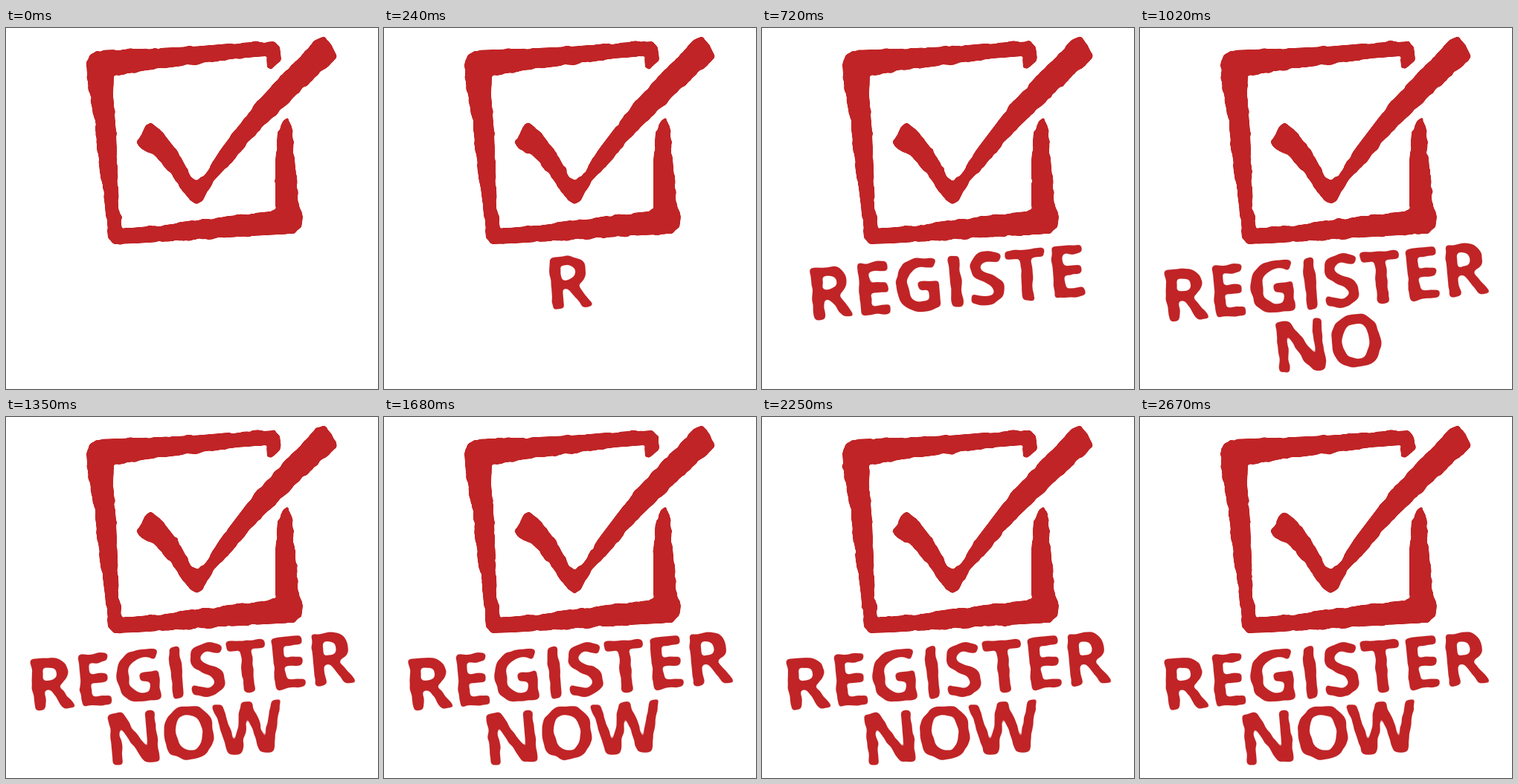
These frames come from a looping animation (500 by 486 pixels, 2.7 s). An HTML page:

```html
<!DOCTYPE html>
<html lang="en">
<head>
<meta charset="utf-8">
<style>
  html, body { margin: 0; height: 100%; overflow: hidden; background: #fff; }
  svg { display: block; width: 500px; height: 486px; }
  .ink { fill: #c02426; }
  text {
    font: 700 98px "Open Sans", "Noto Sans", sans-serif;
    letter-spacing: -1.5px;
    text-anchor: middle;
  }
  #line2 { letter-spacing: -4.5px; }
</style>
</head>
<body>
<svg viewBox="0 0 500 486">
  <defs></defs>
  <g class="ink" filter="url(#roughMark)">
    <path d="M108 48 L111 37 L120 30 L180 28 L250 25 L300 21 L345 18 L361 17 L368 25 L370 42
      L357 55 L351 53 L350 38 L310 41 L270 47 L190 57 L145 64 L144 90 L148 140 L150 190 L152 240
      L156 270 L215 265 L300 253 L355 248 L362 243 L362 180 L365 140 L372 126 L380 120 L384 132
      L390 200 L393 240 L399 253 L397 270 L388 277 L330 280 L240 286 L175 290 L146 291 L137 283
      L133 240 L124 170 L117 110 L110 75 Z"/>
    <path d="M175 155 L186 134 L193 127 L207 136 L232 168 L250 202 L257 205 L266 199 L288 164
      L335 102 L380 54 L418 15 L428 11 L437 22 L445 38 L440 45 L400 80 L372 108 L340 138
      L308 176 L280 206 L264 232 L255 237 L246 231 L228 205 L200 172 L179 160 Z"/>
  </g>
  <g class="ink" filter="url(#roughText)">
    <text id="line1" transform="translate(250.3 377) rotate(-5.1)"></text>
    <text id="line2" transform="translate(253.7 459.5) rotate(-5.1)"></text>
  </g>
</svg>
<script>
const LOOP = 2700, TICK = 30, TYPE = 90;
const find = s => document.querySelector(s);

// Fixed rough edge, a smaller edge that boils, then smoothing of the outline.
const rough = (id, seed, scale, blur) => `
  <filter id="${id}" filterUnits="userSpaceOnUse" x="0" y="0" width="500" height="486"
      color-interpolation-filters="sRGB">
    <feTurbulence type="fractalNoise" baseFrequency=".075" numOctaves="1" seed="${seed}" result="base"/>
    <feTurbulence type="fractalNoise" baseFrequency=".08" numOctaves="1" result="boil"/>
    <feDisplacementMap in="SourceGraphic" in2="base" scale="${scale}"
      xChannelSelector="R" yChannelSelector="G"/>
    <feDisplacementMap in2="boil" scale="2.5" xChannelSelector="R" yChannelSelector="G"/>
    <feGaussianBlur stdDeviation="${blur}"/>
    <feComponentTransfer><feFuncA type="linear" slope="6" intercept="-2.5"/></feComponentTransfer>
  </filter>`;
find('defs').innerHTML = rough('roughMark', 4, 5, 1.8) + rough('roughText', 9, 6, 2.8);

const boilMark = find('#roughMark [result=boil]');
const boilText = find('#roughText [result=boil]');
const line1 = find('#line1'), line2 = find('#line2');
let last = -1;

function draw(now) {
  const t = Math.floor(now % LOOP / TICK) * TICK;
  if (t !== last) {
    last = t;
    const typed = Math.max(0, Math.floor(t / TYPE) - 1);
    line1.textContent = 'REGISTER'.slice(0, typed);
    line2.textContent = 'NOW'.slice(0, Math.max(0, typed - 8));
    boilMark.setAttribute('seed', 20 + Math.floor((t + 72) / 144));
    // The lettering settles before the loop ends.
    boilText.setAttribute('seed', 50 + Math.max(0, Math.floor((Math.min(t, 2100) - 525) / 165)));
  }
  requestAnimationFrame(draw);
}
draw(0);
</script>
</body>
</html>
```
